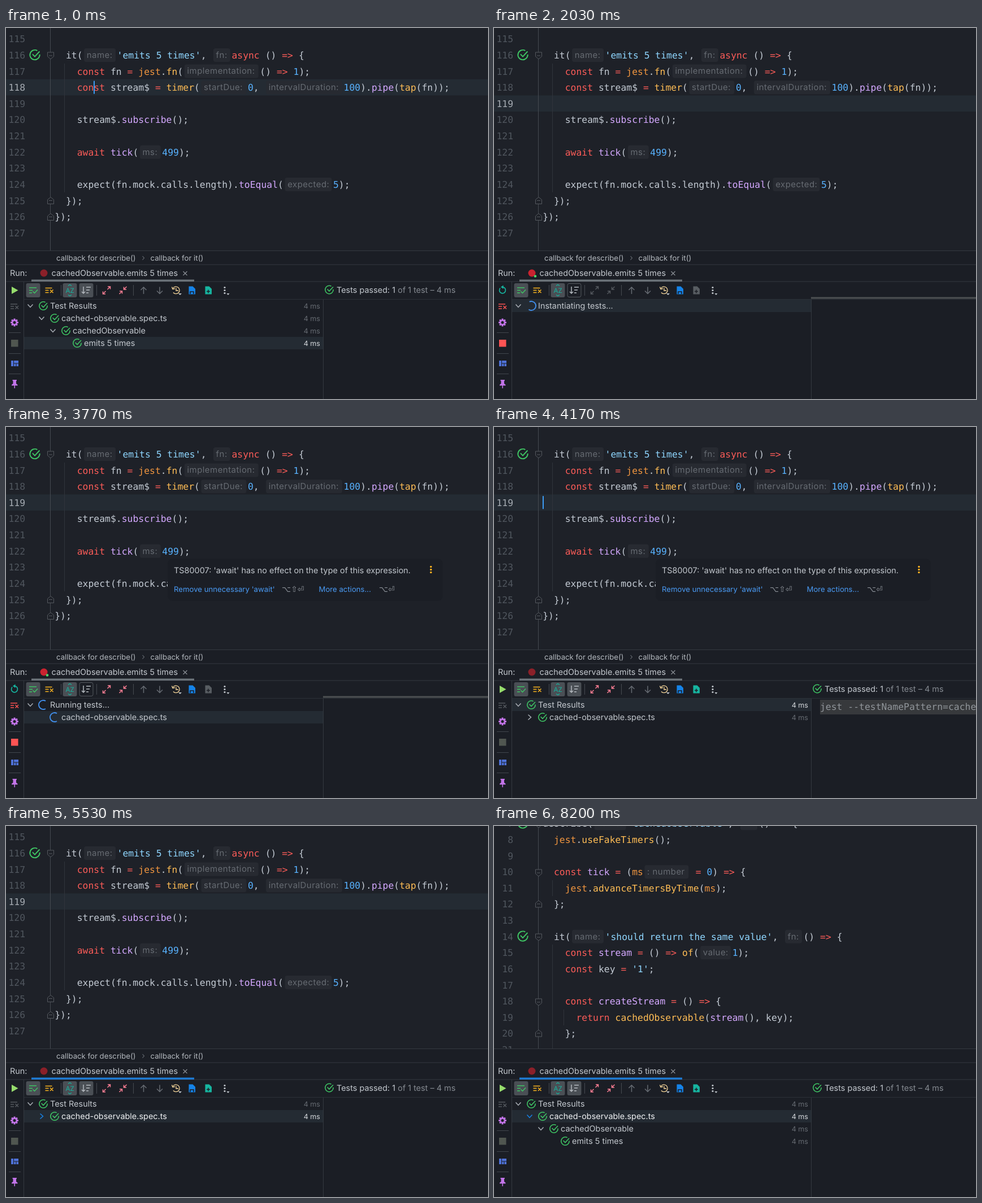
Write an HTML page that moves like this. It is 853x657 px and loops after 8.96 s.

```html
<!DOCTYPE html>
<html lang="en">
<head>
<meta charset="utf-8">
<title>Test run</title>
<style>
html, body { margin: 0; width: 100%; height: 100%; overflow: hidden; background: #1c1f26; }
svg { display: block; width: 853px; height: 657px; }
text { white-space: pre; text-rendering: geometricPrecision; font: 14.45px Inter, sans-serif; }
.mono { font: 16.4px "DejaVu Sans Mono", monospace; }
.hint { font-size: 15px; letter-spacing: .45px; }
.small { font-size: 13.2px; }
.time { font-size: 12.6px; text-anchor: end; }
.num { text-anchor: end; }
.keys { font: 14px "DejaVu Sans", sans-serif; }
</style>
</head>
<body>
<svg id="stage" viewBox="0 0 853 657"></svg>
<script>
const LOOP = 8960, CHAR = 9.873, ROW = 28.63;
// Moments (ms) at which the recorded session changes
const CLICK = 480, BULB = 930, HOVER = 1300, TIP = 1440, RERUN = 1900, CONSOLE = 2150,
  RUNNING = 2760, POPUP = 3000, DONE = 4060, POPUP_END = 4500, SELECT = 5430, OPEN = 5700;

const EDITOR = '#1e2128', PANEL = '#1b1e25', EDGE = '#343940', ACTIVE = '#242b33', TEXT = '#c3c8ce',
  DIM = '#666b72', OFF = '#54585e', GREEN = '#3fc564', RED = '#fa5252', TEAL = '#16b5a0',
  BLUE = '#1583e8', PINK = '#ff7f95', YELLOW = '#ffb620', PURPLE = '#c274e8';
// Token colours: white, red, purple, blue, string, orange, yellow
const INK = { w: '#c3cad3', r: '#fc5c58', p: '#d4a8ff', b: '#58b2ff', s: '#8fd6ff', o: '#f0953f', y: '#ffbd55' };

// Each "~" starts a token: its colour key, or "h" with a pill width and a parameter hint
const endLines = [115, [
  '',
  '~w  it(~h56name:~s\'emits 5 times\'~w, ~h30fn:~rasync ~w() ~r=> ~w{',
  '~r    const ~wfn ~r= ~ojest~w.~yfn~w(~h131implementation:~w() ~r=> ~b1~w);',
  '~r    const ~wstream$ ~r= ~ytimer~w(~h80startDue:~b0~w, ~h135intervalDuration:~b100~w).~ppipe~w(~ytap~w(fn));',
  '',
  '~w    stream$.~psubscribe~w();',
  '',
  '~r    await ~ptick~w(~h37ms:~b499~w);',
  '',
  '~w    expect(fn.mock.calls.length).~ptoEqual~w(~h83expected:~b5~w);',
  '~w  });',
  '~w});',
  ''
]];
const startLines = [7, [
  '~wdescribe(~h56name:~s\'cachedObservable\'~w, ~h30fn:~w() ~r=> ~w{',
  '~o  jest~w.~yuseFakeTimers~w();',
  '',
  '~r  const ~ptick ~r= ~w(~oms~h78: number~r = ~b0~w) ~r=> ~w{',
  '~o    jest~w.~yadvanceTimersByTime~w(~oms~w);',
  '~w  };',
  '',
  '~w  it(~h56name:~s\'should return the same value\'~w, ~h30fn:~w() ~r=> ~w{',
  '~r    const ~pstream ~r= ~w() ~r=> ~yof~w(~h54value:~b1~w);',
  '~r    const ~wkey ~r= ~s\'1\'~w;',
  '',
  '~r    const ~pcreateStream ~r= ~w() ~r=> ~w{',
  '~r      return ~ycachedObservable~w(~pstream~w(), key);',
  '~w    };',
  ''
]];

const rect = (x, y, w, h, fill, more = '') =>
  `<rect x="${x}" y="${y}" width="${w}" height="${h}" fill="${fill}" ${more}/>`;
const fill = (d, color) => `<path d="${d}" fill="${color}"/>`;
const line = (d, color, w = 1.5, bg = 'none') =>
  `<path d="${d}" fill="${bg}" stroke="${color}" stroke-width="${w}"/>`;
const dot = (x, y, r, color) => `<circle cx="${x}" cy="${y}" r="${r}" fill="${color}"/>`;
const text = (x, y, s, color, cls = '') =>
  `<text x="${x}" y="${y}" fill="${color}" class="${cls}">${s}</text>`;
const place = (x, y, s, body) => `<g transform="translate(${x} ${y}) scale(${s})">${body}</g>`;

const tick = (x, y, s = 1) => place(x, y, s,
  line('M7.2 -.5A7.2 7.2 0 1 1 3.6 -6.2M-3.4 -1L0 2.6L7 -5', GREEN, 1.6));
const chevron = (x, y, color = '#a9aeb5') => line(`M${x - 4.5} ${y - 2.5}l4.5 5l4.5 -5`, color);
const listX = (x, y, color) =>
  line(`M${x - 7} ${y - 4}h12M${x - 7} ${y}h6M${x - 7} ${y + 4}h6M${x + 1.5} ${y - 1}l5.5 5.5m0 -5.5l-5.5 5.5`, color);
const fold = (y, up) =>
  line(up ? `M73.5 ${y + 6}h11v-7.5l-5.5 -4.5l-5.5 4.5z` : `M73.5 ${y - 6}h11v7.5l-5.5 4.5l-5.5 -4.5z`, OFF, 1, EDITOR) +
  line(`M76 ${y}h6`, OFF, 1);

function code(str, y) {
  let x = 86.2, out = '';
  for (const token of str.split('~').slice(1)) {
    const hint = token.match(/^h(\d+)(.+)/);
    if (hint) {
      const w = +hint[1];
      out += rect(x + 2.5, y - 12, w, 24, '#272a31', 'rx="4"') + text(x + 7.2, y + 4.8, hint[2], DIM, 'hint');
      x += w + 5;
    } else {
      const s = token.slice(1), body = s.trimStart();
      out += text(x + (s.length - body.length) * CHAR, y + 6, body, INK[token[0]], 'mono');
      x += s.length * CHAR;
    }
  }
  return out;
}

function codeLines([first, lines], top, current) {
  return lines.map((s, i) => {
    const n = first + i, y = top + i * ROW;
    return text(34, y + 6, n, n === current ? '#a5abb2' : '#50565e', 'mono num') + code(s, y);
  }).join('');
}

function editor(t) {
  const gutter = line('M78.5 0V394', '#454a51', 1);
  const guide = (x, a, b) => line(`M${x} ${a}V${b}`, '#30343b', 1);
  if (t >= OPEN) {
    return gutter + guide(103.5, 96, 124) + guide(103.5, 210, 394) + guide(123.5, 325, 353) +
      codeLines(startLines, -4.7) + tick(51, -5, 1.2) + tick(51, 195, 1.2) +
      fold(-3) + fold(83) + fold(138, 1) + fold(197) + fold(312) + fold(367, 1);
  }
  const clicked = t >= CLICK, y = clicked ? 133.7 : 105.1;
  const caretOn = !clicked || t < 980 || (t >= 1470 && t < 1970) || (t >= 3000 && t % 1000 < 500);
  return rect(0, y - 14.3, 853, 28.6, ACTIVE) + gutter + guide(103.5, 63, 291) +
    codeLines(endLines, 19.3, clicked ? 119 : 118) + tick(51, 47.5, 1.2) +
    fold(49) + fold(305.5, 1) + fold(334.5, 1) +
    (caretOn ? rect(clicked ? 86 : 155, y - 11.5, 2, 23, '#3d9cf5') : '') +
    (t >= BULB && t < RERUN ? bulb() : '') +
    (t >= POPUP && t < POPUP_END ? popup() : '');
}

const bulb = () => dot(101, 109, 4.8, YELLOW) + rect(98.5, 113, 5, 2, YELLOW) + rect(99, 116, 4, 1.8, '#b9bdc2') +
  line('M93 109h2.3M106.7 109h2.3M95.5 103.5l1.5 1.5M106.5 103.5l-1.5 1.5M101 101v2', YELLOW, 1.4);

const popup = () => rect(286, 233, 487, 75, PANEL, 'rx="9"') +
  text(297, 258.7, "TS80007: 'await' has no effect on the type of this expression.", TEXT) +
  [247.5, 252.5, 257.5].map(y => dot(752, y, 1.7, YELLOW)).join('') +
  text(297, 291.5, "Remove unnecessary 'await'", '#4a9bf5', 'small') + text(488, 292, '⌥⇧⏎', '#8b9097', 'keys') +
  text(553.5, 291.5, 'More actions...', '#4a9bf5', 'small') + text(660, 292, '⌥⏎', '#8b9097', 'keys');

function spinner(x, y, t) {
  const angle = -40 + (t - 2470) / 1170 * 360;
  return `<g transform="translate(${x} ${y}) rotate(${angle.toFixed(1)})">` +
    line('M4 6.9A8 8 0 1 1 4 -6.9', '#4290ee', 1.8) + '</g>';
}

const button = (x, on) => on ? rect(x - 12.5, 452, 25, 25, '#4a4f55', 'rx="3"')
  : rect(x - 12, 452.5, 24, 24, 'none', 'rx="3" stroke="#555a60"');

const file = (x, color, notch) =>
  fill(`M${x - 5.5} 457.5h7l4.5 4.5v9.5h-11.5z`, color) +
  line(notch, PANEL, 1.5);

function sideBar(t, busy) {
  const gear = [0, 45, 90, 135].map(a => `<rect x="-1.6" y="-7" width="3.2" height="14" rx="1" transform="rotate(${a})"/>`).join('');
  return line('M31.5 449V657', EDGE, 1) + line('M5 539.5h21M5 576.5h21M5 612.5h21', '#41464d', 1) +
    (t >= HOVER && t < RERUN ? rect(3, 452, 25, 25, '#3c4147', 'rx="3"') : '') +
    (busy ? line('M11 460.5A5.5 5.5 0 1 0 15.5 458.8', TEAL, 1.7) + fill('M16.5 455.5v6.6l-4.5 -3.3z', TEAL)
      : fill('M10 458v13l11.5 -6.5z', '#96dc6c')) +
    listX(15, 493, busy ? RED : OFF) +
    place(15, 521.5, 1, `<g fill="${PURPLE}">${gear}</g>` + dot(0, 0, 5, PURPLE) + dot(0, 0, 2.5, PANEL)) +
    rect(9, 552, 12.5, 12.5, busy ? '#ff5454' : '#505650') +
    [[9, 589, 4, 10], [14, 589, 8, 4.5], [14, 594.5, 3.5, 4.5], [18.5, 594.5, 3.5, 4.5]]
      .map(b => rect(...b, '#4f72d8')).join('') +
    fill('M11.5 623h7.5v1.7h-1v5l2.5 2v1.5h-10.5v-1.5l2.5 -2v-5h-1z', PURPLE) + line('M15.2 633v5', PURPLE);
}

function toolBar(t, busy) {
  const arrows = busy && t < RUNNING ? OFF : PINK;
  return button(48, true) + line('M41 460h13M41 464.5h6M41 469h5M47.5 466.5l3 3l5.5 -6', GREEN) +
    listX(76.5, 464.5, YELLOW) +
    button(113, true) + text(105.5, 468.5, '<tspan style="font-size:11.5px">AZ</tspan>', TEAL) +
    line('M110 456.5l3 -2l3 2M110 472.5l3 2l3 -2', TEAL, 1.2) +
    button(142, !busy) + line('M137 458v12m-3 -3l3 3l3 -3M142 459h8M142 464h6M142 469h4', '#b4b9bf') +
    line('M97.5 455v19M160.5 455v19M225.5 455v19', '#454a50', 1) +
    line('M179.5 463l5 -5m-4.5 0h4.5v4.5M176.5 466l-5 5m4.5 0h-4.5v-4.5', arrows) +
    line('M213.5 458l-5 5m0 -4.5v4.5h4.5M200.5 471l5 -5m-4.5 0h4.5v4.5', arrows) +
    line('M243.5 471v-12m-5 5l5 -5l5 5M272 458.5v12m-5 -5l5 5l5 -5', DIM) +
    line('M295.5 461A6.3 6.3 0 1 1 296 468.5M301 460.5v4.5h4M293.5 458.5l1.5 4l4 -1', '#f7d79a', 1.3) +
    fill('M305 470h6l-3 3z', TEXT) +
    file(329, BLUE, 'M326 471v-4h6v4') +
    file(358, busy ? '#585d62' : TEAL, 'M358 463.5v6M355 466.5h6') +
    [459.5, 464.5, 469.5].map(y => dot(387, y, 1.6, TEXT)).join('') + fill('M390.5 470h5l-2.5 3z', TEXT) +
    (busy ? '' : tick(572, 463.5) +
      text(585, 469, 'Tests passed: 1<tspan fill="#858a91"> of 1 test – 4 ms</tspan>', TEXT));
}

function tree(t, busy) {
  const labels = [busy ? (t < RUNNING ? 'Instantiating tests...' : 'Running tests...') : 'Test Results',
    'cached-observable.spec.ts', 'cachedObservable', 'emits 5 times'];
  const opened = t < RERUN || t >= OPEN;
  const count = opened ? 4 : t < RUNNING ? 1 : 2;
  const chosen = t < RERUN ? 3 : t >= SELECT || (busy && t >= RUNNING) ? 1 : 0;
  return labels.slice(0, count).map((label, i) => {
    const y = 492 + 22 * i, x = 43 + 20 * i, sel = i === chosen;
    const blue = sel && t >= SELECT;
    const arrow = i === 3 || (busy && i) ? ''
      : i === 1 && !opened ? line(`M${x - 2.5} ${y - 4.5}l5 4.5l-5 4.5`, blue ? BLUE : '#a9aeb5')
      : chevron(x, y, blue ? BLUE : undefined);
    return (sel ? rect(32, y - 11, 529, 22, ACTIVE) : '') + arrow +
      (busy ? spinner(x + 23, y, t) : tick(x + 23, y) + text(556, y + 4.5, '4 ms', sel ? '#d5d9dd' : DIM, 'time')) +
      text(x + 35, y + 5.2, label, blue ? '#f0f2f4' : TEXT);
  }).join('');
}

const commandLine = () => rect(577, 483, 276, 26, '#37393c') +
  text(577, 501, 'jest --testNamePattern=cachedObservable', '#90959a', 'mono');

const tooltip = () => rect(18, 470, 329, 30, PANEL, 'rx="5"') +
  text(29, 490, "Rerun 'cachedObservable.emits 5 times'", TEXT) +
  text(315, 490, '<tspan class="keys">⌘</tspan>R', '#8b9097');

function panel(t) {
  const busy = t >= RERUN && t < DONE;
  const showCommand = (t >= CONSOLE && t < RUNNING) || (t >= DONE && t < SELECT);
  return rect(0, 394, 853, 263, PANEL) +
    line('M0 394.5h853M0 419h853M0 449h853', EDGE, 1) + line('M32 480.5h821', '#2b3037', 1) +
    (t < OPEN ? text(89, 412, 'callback for describe()', '#b4b9bf', 'small') +
      line('M241.5 404l3 3.3l-3 3.3', DIM, 1.1) + text(255.5, 412, 'callback for it()', '#b4b9bf', 'small') : '') +
    text(7, 439, 'Run:', TEXT) + dot(67, 434, 6.5, busy ? '#c9232f' : '#8b2029') +
    (busy ? dot(73, 439.5, 2.3, '#4fd56a') : '') +
    text(80.5, 439, 'cachedObservable.emits 5 times', TEXT) +
    line('M313.5 431l7 7m0 -7l-7 7', '#8b9097', 1.2) +
    rect(45, 445.5, 288, 3.5, t >= SELECT ? '#1f7ad2' : '#6b7279') +
    sideBar(t, busy) + toolBar(t, busy) + tree(t, busy) +
    line('M561.5 481V657', EDGE, 1) +
    (showCommand ? commandLine() : '') +
    (busy ? rect(561, 476.5, 292, 3, '#4d5052') : '') +
    (t >= TIP && t < RERUN ? tooltip() : '');
}

const stage = document.getElementById('stage');
let shown = '';
function frame() {
  const t = performance.now() % LOOP;
  const picture = rect(0, 0, 853, 394, EDITOR) + editor(t) + panel(t);
  if (picture !== shown) stage.innerHTML = shown = picture;
  requestAnimationFrame(frame);
}
frame();
</script>
</body>
</html>
```
